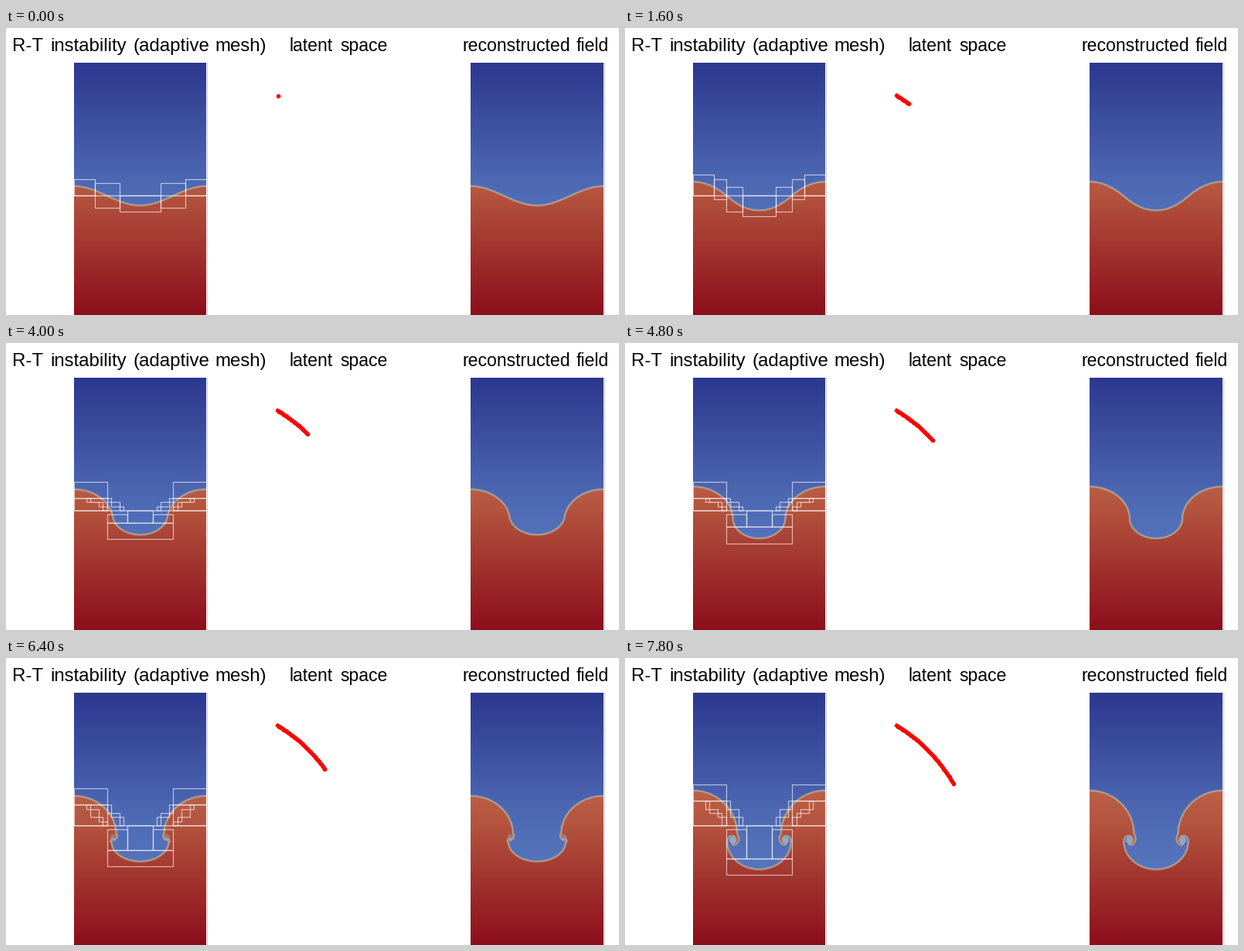
Recreate the animation shown at these times as a matplotlib script. Size 793 by 372 pixels, loop 8000 ms.

```python
import numpy as np
import matplotlib.pyplot as plt
from matplotlib.animation import FuncAnimation
from matplotlib.collections import LineCollection
from matplotlib.patches import Ellipse, Rectangle
from matplotlib.path import Path

W, H, DPI = 793, 372, 100
FRAMES, STEP = 40, 200
PX = 72 / DPI
TOP, MID = 45, 217
HALF = 85.5
COLS = 32
CELL = 2 * HALF / COLS
VORTEX = np.array([51, 236])

plt.rcParams["font.family"] = "Liberation Sans"
fig = plt.figure(figsize=(W / DPI, H / DPI), dpi=DPI, facecolor="white")
ax = fig.add_axes([0, 0, 1, 1])


def smooth(u):
    u = np.clip(u, 0, 1)
    return u * u * (3 - 2 * u)


# ---- interface ----
def edge_y(s):
    return 205 - 3.4 * s - 0.11 * s**2


def centre_y(s):
    return 230 + 3.6 * s + 0.26 * s**2


def hook(n=60):
    """Sheet rolled up around the vortex, from stem to cap rim."""
    u = np.linspace(0, 6, n)
    phi = np.radians(np.interp(u, range(7), [-50, 10, 75, 100, 20, -90, -197]))
    r = np.interp(u, range(7), [9.7, 7.8, 6.5, 4.5, 4.2, 5.5, 6.8])
    return VORTEX + r[:, None] * np.column_stack([np.cos(phi), np.sin(phi)])


HOOK = hook()


def interface(s):
    """Rising dome, waist and sinking cap, mirrored about the centre line.

    The arcs turn from a cosine wave into ellipses as time s (seconds) goes on.
    """
    a = np.linspace(0, np.pi / 2, 50)
    k = smooth(s / 5.4)
    run = (1 - k) * a / (np.pi / 2) + k * np.sin(a)
    dome_x = 42.75 + 1.85 * s
    dome_y = 217.5 + 11 * smooth(s / 6)
    cap_x = dome_x - 5 * max(0, s - 5.2)
    cap_y = dome_y + 9.5 * smooth((s - 4.6) / 1.8)

    dome = np.column_stack([dome_x * run,
                            dome_y - (dome_y - edge_y(s)) * np.cos(a)])
    cap = np.column_stack([HALF - (HALF - cap_x) * run,
                           cap_y + (centre_y(s) - cap_y) * np.cos(a)])[::-1]
    waist = np.linspace(dome[-1], cap[0], len(HOOK))
    curl = np.clip((s - 5.7) / 2.1, 0, 1)
    left = np.vstack([dome, waist * (1 - curl) + HOOK * curl, cap])
    return np.vstack([left, left[::-1] * [-1, 1] + [2 * HALF, 0]])


# ---- adaptive mesh: blocks (x0, x1, y0, y1) in cells, y from the mid line ----
def stairs(x0, x1, y0, n):
    """Small blocks stepping down from (x0, y0) to (x1, 0)."""
    x = np.rint(np.linspace(x0, x1, n + 1))
    y = np.rint(np.linspace(y0, 0, n + 1))
    return list(zip(x[:-1], x[1:], y[:-1], y[1:]))


def column_blocks(s):
    """Blocks that hug a still single-valued interface."""
    x, y = interface(s).T
    breaks = (0, 5, 11, 16) if s < 0.8 else (0, 5, 8, 12, 16)
    blocks = []
    for a, b in zip(breaks, breaks[1:]):
        span = np.interp(np.linspace(a, b, 20) * CELL, x, y)
        lo = min(0, round((span.min() - MID) / CELL - 1.6))
        hi = max(0, round((span.max() - MID) / CELL + 1.5))
        if b == COLS // 2:
            b = COLS - a
        blocks.append((a, b, lo, hi))
    return blocks


def mesh(s):
    top = round((edge_y(s) - MID) / CELL - 1.6)
    bottom = round((centre_y(s) - MID) / CELL + 1.5)
    if bottom < 7:
        blocks = column_blocks(s)
    else:
        blocks = [(0, 8, top, top + 4), (0, 8, top + 4, 0),
                  (8, 13, 1, bottom - 4), (13, 19, 0, bottom - 4),
                  (8, 24, bottom - 4, bottom)]
        blocks += stairs(3, 8, top + 4, 4) + stairs(8, 12, top + 4, 3)
    mirrored = [(COLS - b, COLS - a, c, d) for a, b, c, d in blocks]
    cells = set(blocks + mirrored + [(0, COLS, 0, 0)])
    return [[(88 + CELL * x, MID + CELL * y) for x, y in
             ((a, c), (b, c), (b, d), (a, d), (a, c))]
            for a, b, c, d in sorted(cells)]


# ---- fields ----
def ramp(rows, colors):
    y = np.arange(TOP, H) + 0.5
    rgb = [np.interp(y, rows, c) for c in zip(*colors)]
    return np.stack(rgb, axis=1)[:, None] / 255


BLUE = ramp([45, 200, 275], [(44, 56, 142), (78, 105, 180), (86, 118, 189)])
RED = ramp([172, 215, 372], [(188, 97, 72), (180, 84, 62), (140, 14, 28)])


class Panel:
    def __init__(self, x0, x1):
        self.x0, self.x1 = x0, x1
        self.scale = (x1 - x0) / (2 * HALF)
        box = dict(extent=(x0, x1, H, TOP), aspect="auto",
                   interpolation="nearest")
        ax.add_patch(Rectangle((x0 - 0.5, TOP - 0.5), x1 - x0 + 1, H,
                               fill=False, ec="#777788", alpha=0.4, lw=PX))
        ax.imshow(RED, zorder=1, **box)
        self.blue = ax.imshow(BLUE, zorder=2, **box)
        self.spots = [ax.add_patch(Ellipse((0, 0), 8, 9, lw=0, zorder=3,
                                           color="#9db4cf"))
                      for _ in range(2)]
        self.lines = [ax.plot([], [], color=c, lw=w * PX, alpha=a, zorder=4,
                              solid_capstyle="butt")[0]
                      for c, w, a in (("#8f97ab", 3.6, 0.35),
                                      ("#c2a78c", 1.7, 0.85))]

    def update(self, s):
        curve = interface(s) * [self.scale, 1] + [self.x0, 0]
        area = np.vstack([[self.x0, TOP], curve, [self.x1, TOP],
                          [self.x0, TOP]])
        self.blue.set_clip_path(Path(area), ax.transData)
        for line in self.lines:
            line.set_data(curve[:, 0], curve[:, 1])
        grow = np.clip((s - 5) / 2.8, 0, 1)
        for spot, x in zip(self.spots, (VORTEX[0], 2 * HALF - VORTEX[0])):
            spot.set_center((self.x0 + x * self.scale,
                             VORTEX[1] - 6 * (1 - grow)))
            spot.set_alpha(0.85 * grow)


panels = [Panel(88, 259), Panel(601, 773)]
grid = ax.add_collection(LineCollection([], colors="white", alpha=0.62,
                                        linewidths=1.2 * PX, zorder=5))
trail, = ax.plot([], [], "o-", color="red", ms=5.6 * PX, mew=0,
                 lw=4.8 * PX, zorder=6)

for x, size, word in ((8, 24, "R-T"), (57, 24, "instability"),
                      (165, 24, "(adaptive"), (270, 24, "mesh)"),
                      (366, 23, "latent"), (432, 23, "space"),
                      (590, 23, "reconstructed"), (738, 23, "field")):
    ax.text(x, 30, word, size=size * PX, va="baseline", color="black")

ax.set_xlim(0, W)
ax.set_ylim(H, 0)
ax.axis("off")


def update(i):
    s = i * STEP / 1000
    for panel in panels:
        panel.update(s)
    grid.set_segments(mesh(s))
    past = np.arange(i + 1) * STEP / 1000
    trail.set_data(351.5 + 9.9 * past - 0.06 * past**2,
                   87.5 + 6.2 * past + 0.25 * past**2 + 0.025 * past**3)
    return []


anim = FuncAnimation(fig, update, frames=FRAMES, interval=STEP, repeat=True,
                     repeat_delay=0, blit=False)
plt.show()
```
